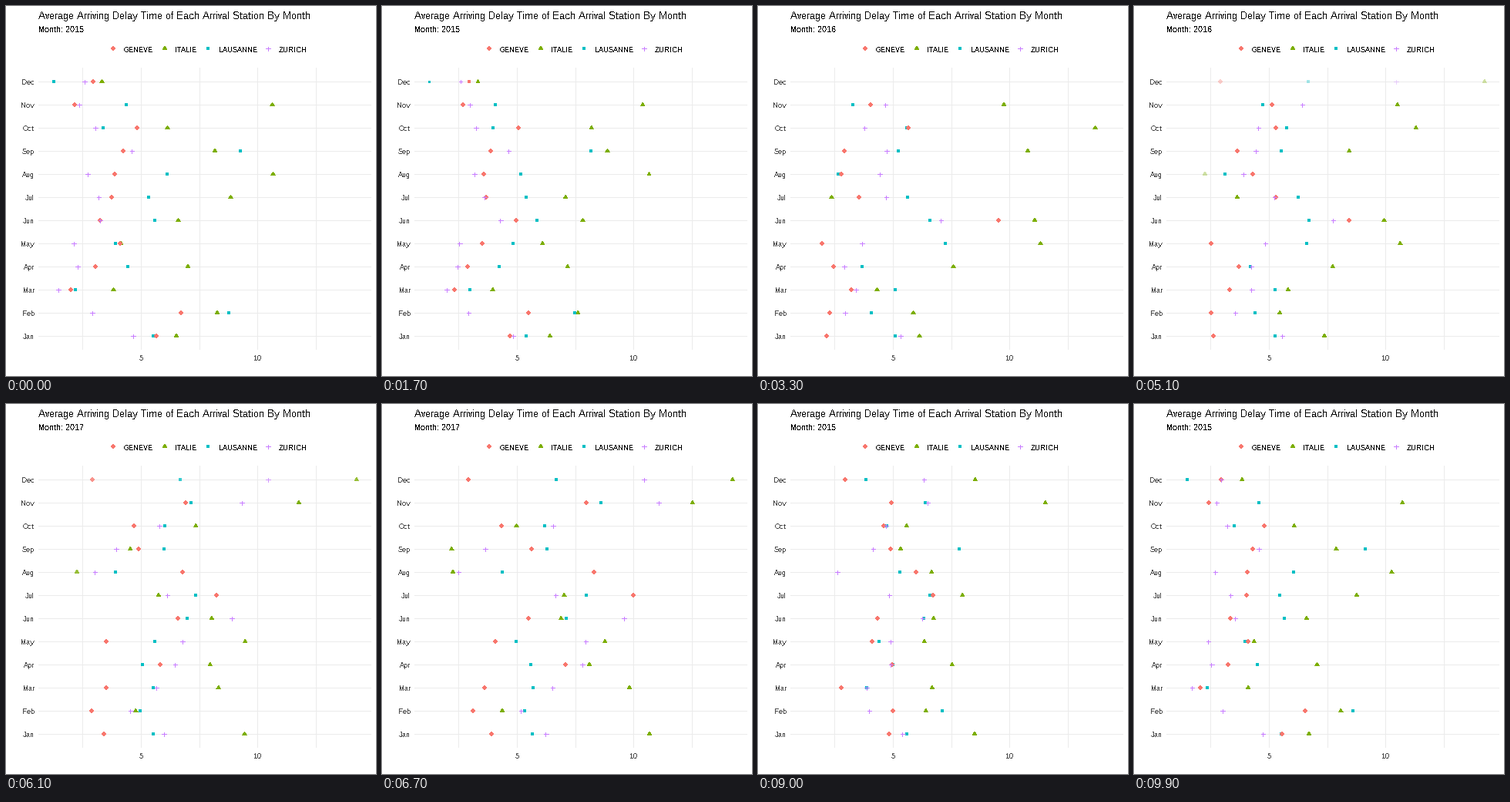
A matplotlib script for the animation above (10 s loop, 480 by 480 pixels).

```python
import numpy as np
import matplotlib.pyplot as plt
from matplotlib.animation import FuncAnimation
from matplotlib.collections import PolyCollection
from matplotlib.colors import to_rgba

# 72 dpi makes one point equal one pixel
SIZE, DPI = 480, 72
plt.rcParams.update({
    "font.family": "Liberation Sans",
    "text.antialiased": False,
    "text.hinting": "native",
    "text.hinting_factor": 1,
    "text.kerning_factor": 7,
})

MONTHS = "Jan Feb Mar Apr May Jun Jul Aug Sep Oct Nov Dec".split()
ROWS = 428 - 30 * np.arange(12)
NA = np.nan

# Horizontal positions in pixels, January to December
DELAY = {
    2015: {
        "GENEVE": [195, 227, 84, 116, 148, 122, 137, 141, 152, 170, 89, 113],
        "ITALIE": [221, 274, 139.5, 236, 149, 223.5, 291.5, 346.5, 271, 209.5, 345.5, 124.5],
        "LAUSANNE": [191, 289, 90, 158, 142, 193, 185, 209, 304, 126, 156, 61.5],
        "ZURICH": [165, 112, 68, 93, 88, 122.5, 120.5, 106, 163.5, 116, 95, 102],
    },
    2016: {
        "GENEVE": [89, 93, 121, 98, 83, 312, 131, 108, 112, 195, 146, NA],
        "ITALIE": [209.5, 201.5, 154.5, 253.5, 366.5, 359, 95.5, NA, 350, 437.5, 342 - 23, NA],
        "LAUSANNE": [178, 147, 178, 135, 243, 223, 194, 104, 182, 193, 122.5, NA],
        "ZURICH": [185, 113, 127, 112, 135, 237.5, 166.5, 158, 167, 138.5, 165.5, NA],
    },
    2017: {
        "GENEVE": [141.5, 118, 133.4, 237.8, 147, 190.3, 326, 275, 194, 155, 265.4, 112],
        "ITALIE": [347, 156, 321, 269, 289.2, 232.4, 236.4, 92, 90.4, 174.5, 402.7, 454.8],
        "LAUSANNE": [195.2, 184.7, 196, 192.7, 174, 239.2, 265, 156, 213.7, 211, 284, 226],
        "ZURICH": [212.8, 180.3, 221.4, 260, 264.4, 314, 225.5, 99.7, 134, 222, 359, 340],
    },
}
COLORS = {"GENEVE": "#F8766D", "ITALIE": "#7CAE00",
          "LAUSANNE": "#00BFC4", "ZURICH": "#C77CFF"}
DRAW_ORDER = ["ITALIE", "LAUSANNE", "GENEVE", "ZURICH"]

# (first frame, last frame, from, to)
MOVES = [(11, 33, 2015, 2016), (45, 67, 2016, 2017), (79, 100, 2017, 2015)]


def snap(v):
    return int(np.floor(v + 0.5))


def box(x, y, w, h):
    return [(x, y), (x + w, y), (x + w, y + h), (x, y + h)]


def disc(x, y, r):
    a = np.linspace(0, 2 * np.pi, 24, endpoint=False)
    return np.column_stack([snap(x) + (r + 0.1) * np.cos(a),
                            snap(y) + (r + 0.1) * np.sin(a)])


def triangle(x, y, r):
    t = 1.5537 * r
    return [(x, y - t), (x + 0.866 * t, y + t / 2), (x - 0.866 * t, y + t / 2)]


def square(x, y, r):
    n = snap(2 * r)
    return box(snap(x - r), snap(y - r), n, n)


def plus(x, y, r):
    a = np.sqrt(2) * r
    x0, x1 = snap(x - a), snap(x + a) + 1
    y0, y1 = snap(y - a), snap(y + a) + 1
    cx, cy = int(np.floor(x)), int(np.floor(y))
    return [(cx, y0), (cx + 1, y0), (cx + 1, cy), (x1, cy), (x1, cy + 1),
            (cx + 1, cy + 1), (cx + 1, y1), (cx, y1), (cx, cy + 1),
            (x0, cy + 1), (x0, cy), (cx, cy)]


SHAPES = {"GENEVE": disc, "ITALIE": triangle, "LAUSANNE": square, "ZURICH": plus}


def marker(name, x, y, scale=1.0):
    r = 0.375 * (4.27 * scale + 0.945)
    return SHAPES[name](x, y + 0.3, r)


def state(frame):
    """Years being blended, how far along, and the year in the subtitle."""
    year = 2015
    for first, last, a, b in MOVES:
        if frame <= first:
            break
        t = min((frame - first) / (last - first), 1.0)
        year = b
        if t < 1:
            return a, b, t, (b if t > 0.5 else a)
    return year, year, 0.0, year


def points(frame):
    a, b, t, _ = state(frame)
    polys, colors = [], []
    for name in DRAW_ORDER:
        for x0, x1, y in zip(DELAY[a][name], DELAY[b][name], ROWS):
            x, scale, alpha = x0 + (x1 - x0) * t, 1.0, 1.0
            if np.isnan(x0) and np.isnan(x1):
                continue
            if np.isnan(x1):      # leaving points shrink
                x, scale = x0, 1 - t
            elif np.isnan(x0):    # arriving points fade in
                x, alpha = x1, t ** 0.8
            polys.append(marker(name, x, y, scale))
            colors.append(to_rgba(COLORS[name], alpha))
    return polys, colors


fig = plt.figure(figsize=(SIZE / DPI, SIZE / DPI), dpi=DPI, facecolor="white")
ax = fig.add_axes([0, 0, 1, 1])
ax.set_xlim(0, SIZE)
ax.set_ylim(SIZE, 0)
ax.axis("off")


def add_shapes(polys, colors, z):
    shapes = PolyCollection(polys, facecolors=colors, linewidths=0,
                            edgecolors="none", antialiaseds=False, zorder=z)
    shapes.set_snap(False)
    ax.add_collection(shapes, autolim=False)
    return shapes


def label(x, y, text, size, color="black", ha="left"):
    return ax.text(x, y, text, fontsize=size, color=color, ha=ha, va="baseline")


grid = [box(42, y, 432, 1) for y in ROWS]
grid += [box(x, 80, 1, 366) for x in (99, 175, 251, 326, 402)]
add_shapes(grid, "#EBEBEB", 1)

label(42, 17, "Average Arriving Delay Time of Each Arrival Station By Month", 13)
subtitle = label(42, 34, "", 11)

keys = [("GENEVE", 139, 153), ("ITALIE", 206, 219),
        ("LAUSANNE", 262, 276), ("ZURICH", 340, 354)]
for name, key_x, text_x in keys:
    label(text_x, 60, name, 9)
add_shapes([marker(n, x, 55) for n, x, _ in keys],
           [COLORS[n] for n, _, _ in keys], 2)

for month, y in zip(MONTHS, ROWS):
    label(37, y + 4, month, 9, "#4D4D4D", "right")
for value, x in ((5, 175), (10, 326)):
    label(x, 460, str(value), 9, "#4D4D4D", "center")

dots = add_shapes(*points(0), 3)


def draw(frame):
    polys, colors = points(frame)
    dots.set_verts(polys)
    dots.set_facecolor(colors)
    subtitle.set_text(f"Month: {state(frame)[3]}")
    return dots, subtitle


anim = FuncAnimation(fig, draw, frames=100, interval=100, repeat=True,
                     init_func=lambda: draw(0))
plt.show()
```
